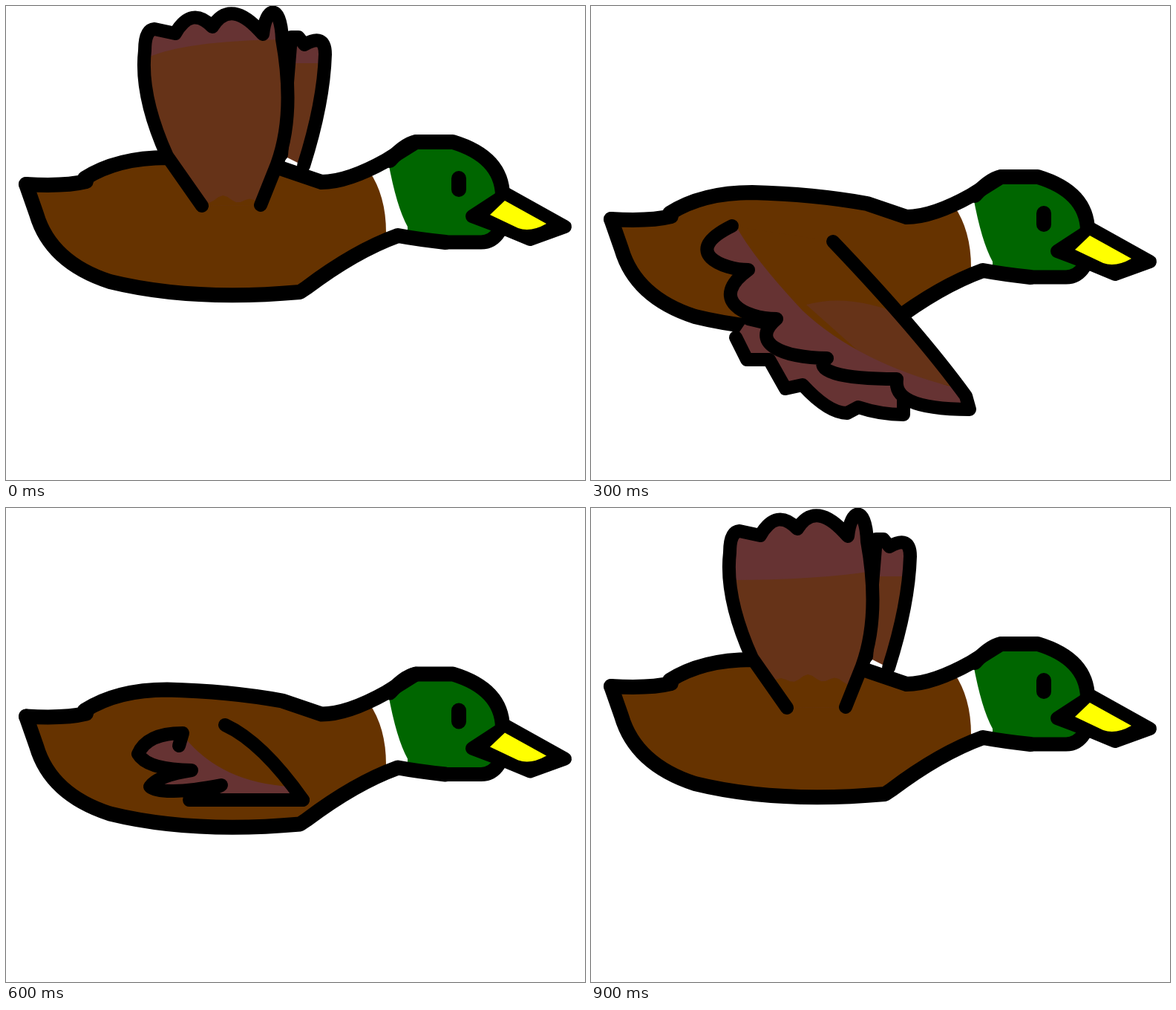
An HTML page with a canvas that plays this animation: 780x638 px, repeating every 0.93 s.

```html
<!DOCTYPE html>
<html lang="en">
<head>
<meta charset="utf-8">
<title>Flying duck</title>
<style>
  html, body { margin: 0; width: 100%; height: 100%; overflow: hidden; background: #fff; }
  canvas { display: block; }
</style>
</head>
<body>
<canvas id="stage" width="780" height="638"></canvas>
<script>
const ctx = document.getElementById('stage').getContext('2d');
const STEP = 30, STEPS = 31;
const BROWN = '#663300', WING = '#663318', TIP = '#663333', GREEN = '#006600';

function fill(d, color) {
  ctx.fillStyle = color;
  ctx.fill(new Path2D(d));
}
function ink(d, width) {
  ctx.lineWidth = width;
  ctx.stroke(new Path2D(d));
}
function at(x, y, paint) {
  ctx.save();
  ctx.translate(x, y);
  paint();
  ctx.restore();
}

// Trailing edge: one curled lobe per feather, flatter towards the tip.
function feathers(curl, [first, ...rest]) {
  let [x, y] = first, d = `M${x} ${y}`;
  rest.forEach(([qx, qy], i) => {
    const c = curl * (1 - i / 4.2);
    d += `C${x - c} ${y + 0.6 * (qy - y)} ${qx - 20 - 0.6 * (qx - x)} ${qy} ${qx} ${qy}`;
    [x, y] = [qx, qy];
  });
  return d;
}

// Area below an uneven brush edge.
function ragged(y, depth) {
  let d = `M190 ${y + depth}`;
  for (let x = 190; x <= 430; x += 6) d += `L${x} ${y + 4 * Math.sin(x / 6) + 3 * Math.sin(x / 17)}`;
  return d + `V${y + depth}Z`;
}

const bodies = {
  level: {
    y: 0, headX: 0,
    tail: 'M27 240Q80 243 108 236',
    top: 'M106 232Q150 204 217 204Q300 206 372 219L425 237Q460 237 512 208L552 183',
    bottom: 'L592 318Q555 314 528 309Q470 330 405 379L396 385Q250 398 140 371Q60 345 41 280L27 240'
  },
  raised: {
    y: 18.8, headX: 12.5,
    tail: 'M43 243Q62 254 90 255',
    top: 'M92 254Q270 202 375 237Q410 257 435 257L487 238L515 233L540 222L562 203',
    bottom: 'L604 336L540 325Q500 328 460 362L430 388Q400 416 350 416Q205 416 95 374Q40 345 38 270L43 243'
  }
};
const SKULL = 'L517 208Q540 183 555 183H602Q668 203 669 255';
const BEAK = 'M628 283L674 253L753 297L706 314L665 297Z';

function drawBody({ y, headX, tail, top, bottom }, bob) {
  at(0, bob - y, () => fill(top + bottom, BROWN));
  at(headX, bob, () => fill('M504 222' + SKULL + 'V300L640 318H592L516 303L508 255Z', GREEN));
  at(0, bob, () => fill('M489 222Q512 255 512 305H541V297Q526 270 515 210Z', '#fff'));
  at(0, bob - y, () => {
    ink(tail, 20);
    ink(top, 20);
    ink(bottom.replace('L', 'M'), 20);
  });
  at(headX, bob, () => {
    ink(SKULL.replace('L', 'M'), 20);
    ink('M664 304Q655 318 640 318H592', 19);
    fill(BEAK, '#000');
    ink(BEAK, 18);
    fill('M672 262L728 293Q707 305 690 299L652 281Z', '#ffff00');
    ink('M610 232V247', 20);
  });
}

// Outline with a base colour, shading clipped inside it, then ink.
function wing(line, base, ...shades) {
  fill(line, base);
  ctx.save();
  ctx.clip(new Path2D(line));
  shades.forEach(([d, color]) => fill(d, color));
  ctx.restore();
  ink(line, 18);
}

function up(tip, farTip, root) {
  wing('M371 200L384 42H394L402 52Q430 36 430 65Q428 130 401 215', WING,
    [`M370 ${farTip}H440V20H370Z`, TIP]);
  wing('M264 269L217 202Q180 120 187 60Q187 32 200 31L228 37Q250 -1 278 28Q303 -12 346 38' +
    'C350 0 370 -5 372 45Q390 145 365 213L343 268', WING,
    [tip + 'V-20H180Z', TIP], [ragged(root, 60), BROWN]);
}

function mid(tip, root) {
  wing('M404 140L440 146L459 155Q455 185 462 190L472 200Q440 222 380 249', TIP,
    ['M405 180L433 208L400 240H370Z', WING]);
  wing('M197 287Q228 175 285 139Q330 110 378 104L377 118L362 133L393 134L400 140V172L417 177Q370 262 312 295', WING,
    [`M${tip} 115L${tip + 60} 205L390 225L440 170L390 90Z`, TIP], [ragged(root, 60), BROWN]);
}

function down() {
  wing('M195 446L210 476H240L262 515L285 510Q320 548 345 548L360 540Q390 550 421 550V528L412 502L250 430L212 421', TIP);
  wing(feathers(72, [[190, 296], [212, 355], [250, 421], [318, 474], [412, 502], [510, 543]]) +
    'L505 525Q440 436 326 317', BROWN,
    ['M290 402Q350 385 430 420L520 515L400 500Z', WING],
    ['M190 285Q210 330 285 410Q360 480 488 513L515 545H150V320Z', TIP]);
}

function low() {
  wing('M412 438L420 466L434 570L412 545L383 460', TIP);
  wing(feathers(32, [[177, 321], [192, 402], [208, 468], [271, 524], [350, 578], [425, 619]]) +
    'Q410 500 297 342', BROWN,
    [ragged(425, 200), WING],
    ['M180 312Q215 340 228 425Q275 527 413 587L430 625H150V340Z', TIP]);
}

function tucked() {
  fill('M182 332Q205 308 240 308Q290 370 384 375L394 393H260L195 376L250 353Z', TIP);
  ink('M233 320L238 303Q190 303 178 331Q190 352 250 353Q205 360 194 375Q210 388 290 373L247 393H400', 18);
  ink('M295 292Q345 315 400 393', 18);
}

// First step, body and wings of each pose.
const { level, raised } = bodies;
const poses = [
  [0, level, () => up('M180 75Q230 45 395 45', 77, 262)],
  [3, raised, () => mid(300, 250)],
  [7, level, down],
  [14, raised, low],
  [20, level, tucked],
  [25, raised, () => mid(318, 257)],
  [29, level, () => up('M180 97Q320 97 395 82', 92, 231)]
];

function draw(i) {
  ctx.fillStyle = '#fff';
  ctx.fillRect(0, 0, 780, 638);
  ctx.lineCap = ctx.lineJoin = 'round';
  const [, body, wings] = poses.findLast(p => p[0] <= i);
  // The body sinks a little faster than it rises.
  drawBody(body, Math.min(4.7 * i, 4.05 * (STEPS - 1 - i)));
  wings();
}

const start = performance.now();
let shown = -1;
function tick() {
  const i = Math.floor((performance.now() - start) / STEP) % STEPS;
  if (i !== shown) draw(shown = i);
  requestAnimationFrame(tick);
}
tick();
</script>
</body>
</html>
```
